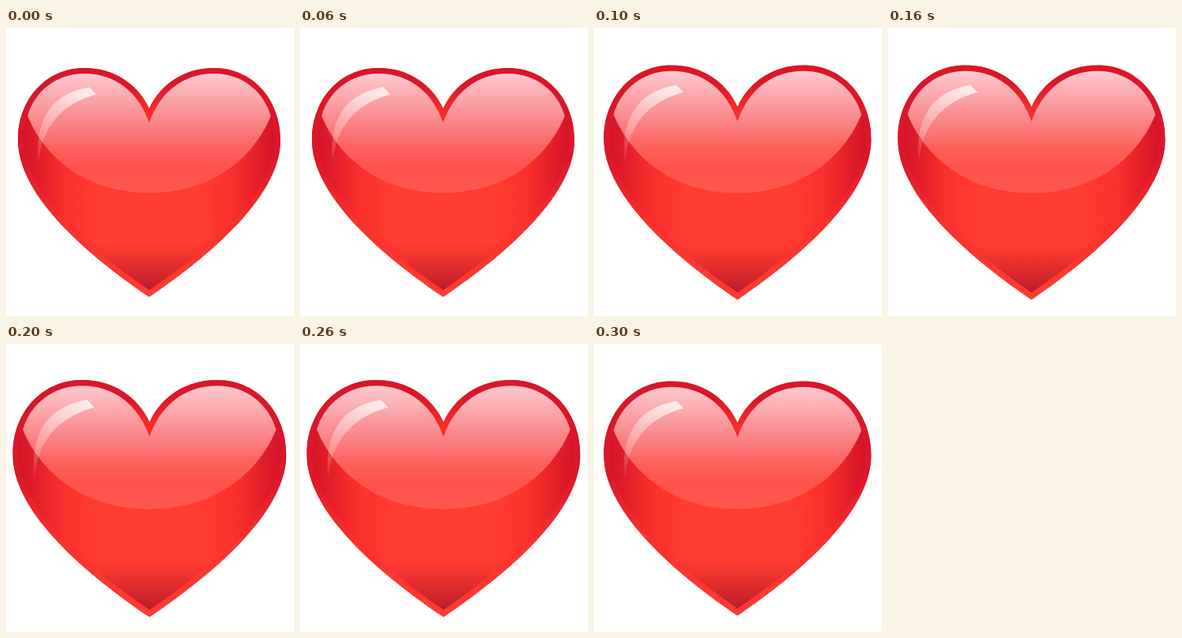
An HTML page that plays this animation: 360 by 360 pixels, repeating every 400 ms.

```html
<!DOCTYPE html>
<html lang="en">
<head>
<meta charset="utf-8">
<title>Beating heart</title>
<style>
  html, body { margin: 0; width: 100%; height: 100%; overflow: hidden; background: #fff; }
  svg { display: block; width: 100%; height: 100%; }
</style>
</head>
<body>
<svg viewBox="0 0 360 360">
  <defs>
    <!-- Drawn around the heart's own centre axis, x = 0 -->
    <path id="outline" d="M0 101 C-14 70 -44 50 -81 50 C-129 50 -164 89 -164 140 C-164 204 -90 275 0 336
      C90 275 164 204 164 140 C164 89 129 50 81 50 C44 50 14 70 0 101Z"/>
    <clipPath id="inside"><use href="#outline"/></clipPath>
    <linearGradient id="body" gradientUnits="userSpaceOnUse" x1="0" y1="0" x2="164" y2="0" spreadMethod="reflect">
      <stop offset=".4" stop-color="#ff3c31"/>
      <stop offset=".65" stop-color="#f92f2d"/>
      <stop offset=".95" stop-color="#d51429"/>
    </linearGradient>
    <linearGradient id="tipShade" gradientUnits="userSpaceOnUse" x1="0" y1="268" x2="0" y2="328">
      <stop offset="0" stop-color="#d8262b" stop-opacity="0"/>
      <stop offset=".5" stop-color="#cc222a" stop-opacity=".6"/>
      <stop offset="1" stop-color="#b81b2a"/>
    </linearGradient>
    <linearGradient id="rim" gradientUnits="userSpaceOnUse" x1="0" y1="50" x2="0" y2="336">
      <stop offset="0" stop-color="#d9162a"/>
      <stop offset=".4" stop-color="#dc172a"/>
      <stop offset=".68" stop-color="#f8322f"/>
      <stop offset="1" stop-color="#ff3c33"/>
    </linearGradient>
    <radialGradient id="notchGlow" gradientUnits="userSpaceOnUse" cx="0" cy="108" r="45">
      <stop offset="0" stop-color="#fa2e2b"/>
      <stop offset="1" stop-color="#fa2e2b" stop-opacity="0"/>
    </radialGradient>
    <linearGradient id="gloss" gradientUnits="userSpaceOnUse" x1="0" y1="57" x2="0" y2="206">
      <stop offset="0" stop-color="#fdc9ce"/>
      <stop offset=".36" stop-color="#fa8d90"/>
      <stop offset=".62" stop-color="#fc625f"/>
      <stop offset=".8" stop-color="#fe534b"/>
      <stop offset="1" stop-color="#ff5750"/>
    </linearGradient>
    <linearGradient id="shine" gradientUnits="userSpaceOnUse" x1="-70" y1="74" x2="-138" y2="168">
      <stop offset="0" stop-color="#fff" stop-opacity=".8"/>
      <stop offset=".45" stop-color="#fff" stop-opacity=".4"/>
      <stop offset="1" stop-color="#fff" stop-opacity=".08"/>
    </linearGradient>
  </defs>
  <g id="heart">
    <use href="#outline" fill="url(#body)"/>
    <g clip-path="url(#inside)">
      <rect x="-164" y="268" width="328" height="68" fill="url(#tipShade)"/>
      <use href="#outline" fill="none" stroke="url(#rim)" stroke-width="14"/>
      <circle cy="108" r="45" fill="url(#notchGlow)"/>
    </g>
    <path fill="url(#gloss)" d="M0 118.5 C-13 81 -42 57 -81 57 C-116 57 -143 79 -152 110
      C-131 161 -80 206 0 206 C80 206 131 161 152 110 C143 79 116 57 81 57 C42 57 13 81 0 118.5Z"/>
    <path fill="url(#shine)" d="M-75 74 L-66 83 C-108 94 -134 122 -138 168 C-143 122 -128 83 -75 74Z"/>
  </g>
</svg>
<script>
  const STEP_MS = 100;
  const CENTRE_Y = 193;
  const rest = { x: 179, scaleX: 1, scaleY: 1 };
  const swelling = { x: 179.4, scaleX: 1.019, scaleY: 1.024 };
  const full = { x: 179.4, scaleX: 1.042, scaleY: 1.035 };
  const beat = [rest, swelling, full, swelling];
  const heart = document.getElementById("heart");

  function draw(now) {
    const { x, scaleX, scaleY } = beat[Math.floor(now / STEP_MS) % beat.length];
    heart.setAttribute("transform",
      `translate(${x} ${CENTRE_Y}) scale(${scaleX} ${scaleY}) translate(0 ${-CENTRE_Y})`);
  }

  const start = performance.now();
  function tick() {
    draw(performance.now() - start);
    requestAnimationFrame(tick);
  }
  tick();
</script>
</body>
</html>
```
